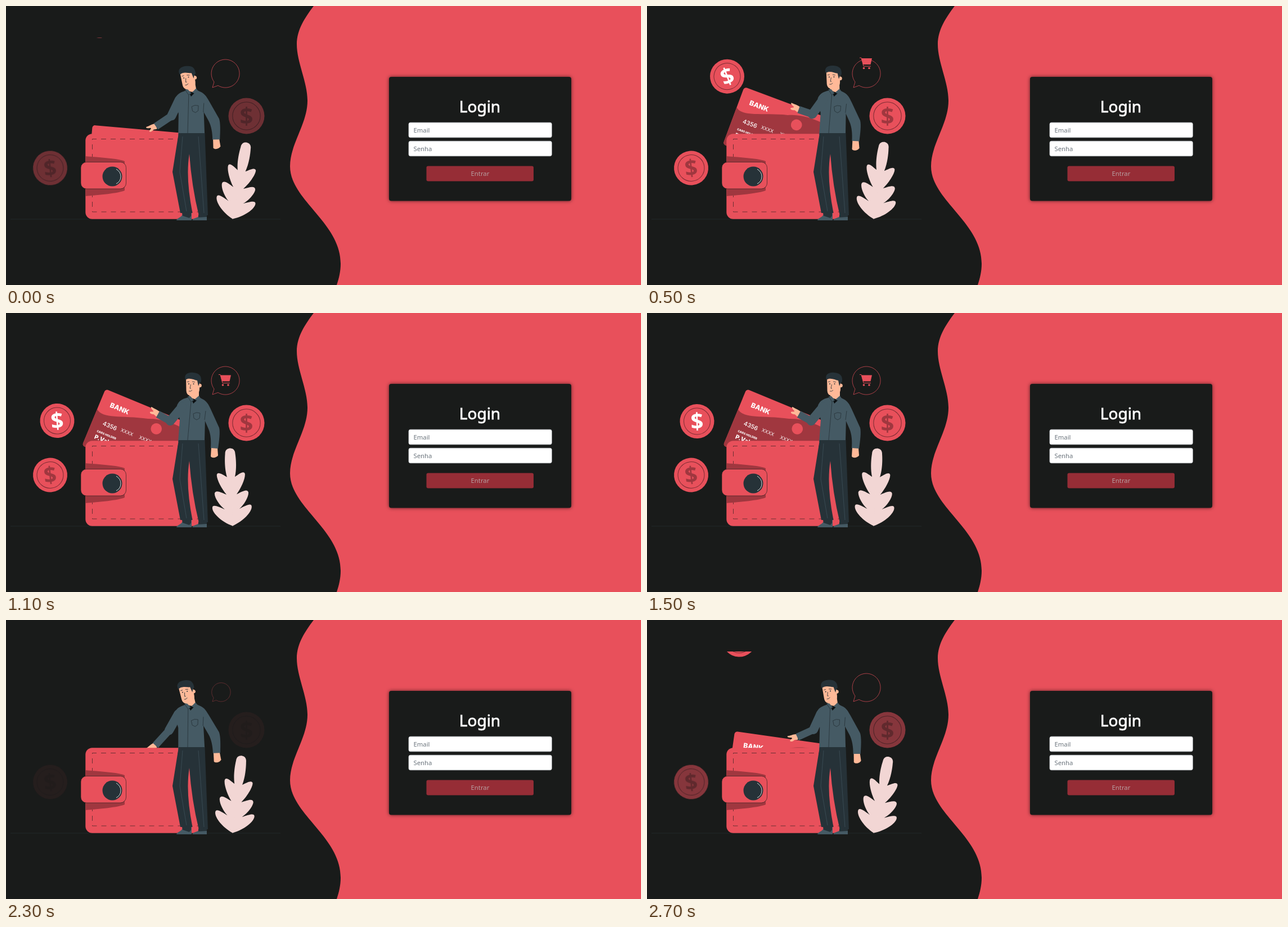
Animation, 1129 px wide and 496 px high, one loop 2800 ms. Source, as an HTML page:

```html
<!DOCTYPE html>
<html lang="pt">
<head>
<meta charset="utf-8">
<title>Login</title>
<style>
  html, body { margin: 0; height: 100%; overflow: hidden; background: #191b1a; }
  svg { display: block; width: 100vw; height: 100vh; font-family: "Noto Sans", "Open Sans", sans-serif; }
  .red { fill: #e8505b; }
  .deep { fill: #a0373f; }
  .navy { fill: #263238; }
  .shirt { fill: #455a64; }
  .skin { fill: #ffb998; }
  .line { fill: none; stroke: #263238; stroke-width: .8; }
  .card text { fill: #fff; font-family: Inter, sans-serif; font-weight: 800; }
  .sign { font-size: 40px; font-weight: 800; text-anchor: middle; }
  .panel { filter: drop-shadow(0 0 3px rgba(0, 0, 0, .6)); }
  .title { font-size: 28px; font-weight: 500; text-anchor: middle; stroke: #fff; stroke-width: .8; }
  .hint { font-size: 11.3px; fill: #6c757d; }
</style>
</head>
<body>
<svg viewBox="0 0 1129 496">
  <defs>
    <clipPath id="top"><path d="M0 56H500V400H0Z"/></clipPath>
    <g id="coin">
      <circle class="red" r="30.5"/>
      <circle r="23.5" fill="none" stroke="#7d2c33"/>
    </g>
    <g id="darkCoin">
      <use href="#coin"/>
      <text class="sign deep" y="14">$</text>
    </g>
    <path id="leaf" d="M-.5 0H0C20-8 35-24 35-33C35-41 24-35 13-30C22-37 31-52 30-59C28-66 18-60 9-56C17-66 26-84 25-92C23-98 15-92 7-87C11-102 10-120 9-128C9-135 5-138 0-138H-.5Z"/>
  </defs>

  <path class="red" d="M547 0C532 20 517 42 517 68C517 100 536 135 536 168C536 210 505 245 505 285C505 345 595 385 595 458C595 472 592 484 588 496H1129V0Z"/>
  <path d="M8 379H488" stroke="#262c2f" stroke-width=".7"/>

  <g id="coins">
    <use href="#darkCoin" transform="translate(78.5 288) rotate(-6)"/>
    <use href="#darkCoin" transform="translate(427.5 195.5) scale(1.05)"/>
  </g>

  <path id="bubble" fill="none" stroke="#e8505b" stroke-width=".7" d="M370 135L367 145L377 141.4A25 25 0 1 0 370 135Z"/>
  <g clip-path="url(#top)">
    <g id="cart" class="red">
      <path d="M381 110.500H400L397.500 121.500H384Z"/>
      <path d="M378 109.500H381L385 124.500H398" fill="none" stroke="#e8505b"/>
      <circle cx="385.500" cy="128" r="1.800"/>
      <circle cx="395" cy="128" r="1.800"/>
    </g>
    <g id="drop">
      <use href="#coin"/>
      <text class="sign" y="14" fill="#fff">$</text>
    </g>
  </g>

  <g id="plant" fill="#f2d6d4">
    <use href="#leaf"/>
    <use href="#leaf" transform="scale(-1 1)"/>
  </g>

  <g id="card" class="card">
    <g transform="translate(177 135) rotate(22.5)">
      <rect class="red" width="170" height="109" rx="5"/>
      <path class="deep" d="M0 39C15 52 45 32 90 20C110 12 130 8 170 14V109H5Q0 109 0 104Z"/>
      <circle class="red" cx="110.500" cy="31" r="9.800"/>
      <text x="18.500" y="27" font-size="12.200">BANK</text>
      <text x="19" y="61.500" font-size="10.500" style="font-weight:500">4356</text>
      <text x="53" y="59.500" font-size="8.500" style="font-weight:400">XXXX</text>
      <text x="88" y="59" font-size="8.500" style="font-weight:400">XXXX</text>
      <text x="14.300" y="76.500" font-size="5.200">CARS HOLDER</text>
      <text x="14.300" y="89" font-size="10.500">P.Vald</text>
    </g>
  </g>
  <path id="hand" class="skin" d="M1-5C-6-6-10-3-17-2C-19 0-14 1-10 1L-9 2L-13 6C-13 9-8 8-5 5H1Z"/>

  <g>
    <rect class="red" x="141.300" y="227.300" width="207" height="151.400" rx="12"/>
    <path d="M348 236.500H153.500V366H348" fill="none" stroke="#191b1a" stroke-width=".6" stroke-dasharray="9 8"/>
    <path class="deep" d="M141.300 267C165 269 200 271 211 276V328C200 333 165 336 141.300 338Z"/>
    <rect class="red" x="133" y="277.500" width="80.500" height="47.500" rx="10" stroke="#191b1a" stroke-width=".6"/>
    <circle class="navy" cx="189" cy="303" r="17.500"/>
    <path d="M196 290Q204 295 204 303Q204 312 196 316" fill="none" stroke="#fff" stroke-width=".8"/>
  </g>

  <g id="body">
    <g id="head">
      <path class="skin" d="M327 138L343 132V152L334 158L326 150Z"/>
      <path class="skin" d="M320 115L345 116L344 135C344 142 340 147 333 147.500C324 148 321 144 320.500 138Z"/>
      <circle class="skin" cx="344.500" cy="129" r="3.300"/>
      <path class="navy" d="M319 119C316 110 322 105 333 106C344 107 348 112 347 122L344 125L342 130L340 120C334 119 326 114 319 119Z"/>
      <path class="line" d="M322 122.500L326 122M331 122L336 123M328.500 127L327 134H329M325 139Q329 140 331 137"/>
      <circle class="navy" cx="325" cy="126" r="1"/>
      <circle class="navy" cx="333.500" cy="126" r="1"/>
    </g>
    <g id="arm">
      <path class="skin" d="M365 239L376 240L377 253C375 257 367 259 364 255Z"/>
      <path class="shirt" d="M345 151C358 156 360 163 364 171L379 204C381 212 379 227 377 241L364 240C365 228 364 215 360 206L353 190Z"/>
    </g>
    <path class="shirt" d="M324 150C312 153 308 156 304 164L309 190L306 229H353L354 185L357 161C352 156 347 152 343 149L334 156Z"/>
    <path d="M329 151L333 161L343 152L335 153Z" fill="#0c1012"/>
    <path class="shirt" d="M323 148L328 148L334 155L329 158ZM343 147L346 152L340 156L335 154Z"/>
    <path class="line" d="M329 158L323 226M333 179L339 177L345 178L344 187L339 190L334 187ZM353 190L355 174M323 148L329 158L334 155"/>
  </g>

  <path class="navy" d="M307 226H353.500L359 372L343 373Q330 320 326 263Q319 305 331.500 368L310 368L296 295Z"/>
  <path class="shirt" d="M312 369L330 368V381H303C305 376 313 376 314 369ZM342 373L357 372V381H331C334 376 341 377 343 373Z"/>
  <path class="navy" d="M313 368H329V373L326 377L314 373ZM342 371L357 370V375L342 376Z"/>
  <path d="M314 232L309 295L321 365M342 232L352 368" fill="none" stroke="#455a64" stroke-width=".6"/>

  <g fill="none" stroke="#455a64" stroke-linecap="round">
    <path id="upper" stroke-width="16"/>
    <path id="elbow" stroke-width="13.500"/>
    <path id="fore" stroke-width="13" stroke-linecap="butt"/>
  </g>

  <rect class="panel" x="681" y="126" width="324" height="220.500" rx="4" fill="#191b1a"/>
  <g fill="#fff">
    <text class="title" x="842.500" y="188.500">Login</text>
    <g stroke="#ced4da" stroke-width=".7">
      <rect x="716" y="207.200" width="254.300" height="26.600" rx="3"/>
      <rect x="716" y="240.200" width="254.300" height="26.600" rx="3"/>
    </g>
  </g>
  <text class="hint" x="724.500" y="224.500">Email</text>
  <text class="hint" x="724.500" y="257.500">Senha</text>
  <rect x="747.500" y="284.500" width="190.500" height="27" rx="3" fill="#962d36"/>
  <text x="843" y="302" font-size="11.300" text-anchor="middle" fill="#b79fa1">Entrar</text>
</svg>

<script>
const LOOP = 2800, STEP = 100, RESTART = 1900;
const el = id => document.getElementById(id);
const set = (id, name, value) => el(id).setAttribute(name, value);
const move = (id, value) => set(id, 'transform', value);
const clamp = x => Math.max(0, Math.min(1, x));
const ease = x => (1 - Math.cos(Math.PI * clamp(x))) / 2;

// Smooth curve through [time, value] keys that never overshoots them.
function track(keys, u) {
  const last = keys.length - 1;
  if (u <= keys[0][0]) return keys[0][1];
  if (u >= keys[last][0]) return keys[last][1];
  const i = keys.findIndex(k => k[0] > u) - 1;
  const rate = j => (keys[j + 1][1] - keys[j][1]) / (keys[j + 1][0] - keys[j][0]);
  const slope = j => {
    if (j === 0) return rate(0);
    if (j === last) return 0;
    const a = rate(j - 1), b = rate(j);
    return a * b > 0 ? 2 * a * b / (a + b) : 0;
  };
  const [t0, v0] = keys[i], [t1, v1] = keys[i + 1];
  const d = t1 - t0, x = (u - t0) / d, y = 1 - x;
  return y * y * (1 + 2 * x) * v0 + x * x * (3 - 2 * x) * v1
    + d * x * y * (y * slope(i) - x * slope(i + 1));
}

const dropX = [[600, 167], [700, 166], [800, 164], [1000, 154], [1400, 129], [1800, 91], [1900, 89]];
const dropY = [[600, 10], [700, 26], [800, 35], [1000, 70], [1400, 169], [1800, 191.5], [1900, 192.5]];
const dropTurn = [[1000, -20], [1400, -22], [1800, -5], [1900, -2]];
const cartY = [[900, -80], [1000, -54], [1300, -6], [1400, -1], [1500, 0]];
const sway = [[0, 0], [400, 6.7], [700, 10.4], [800, 11.3], [1000, 12.2], [1400, 2.1], [1800, -2], [2200, 2.7]];
const grow = [[200, 0], [400, .67], [500, 1]];

function draw(t) {
  // u is the time since the illustration last restarted
  const u = t < RESTART ? Math.min(t + 700, 2200) : t - RESTART;
  const lift = 1.1 * ease((u - 400) / 1000) - .1;
  const back = lift - 1;

  set('coins', 'opacity', clamp((u - 350) / 850));
  const size = track(grow, u);
  move('bubble', `translate(367 145) scale(${size}) translate(-367 -145)`);
  set('bubble', 'opacity', size);
  move('cart', `translate(0 ${track(cartY, u)})`);
  move('drop', `translate(${track(dropX, u)} ${track(dropY, u)}) rotate(${track(dropTurn, u)})`);
  move('plant', `translate(403 378.5) rotate(${track(sway, u)})`);

  move('card', `rotate(${20 * back} 415 249)`);
  move('body', `rotate(${4 * back} 330 226)`);
  move('head', `rotate(${8 * back} 334 150)`);
  move('arm', `rotate(${2 * back} 357 160)`);

  const shoulder = [307 + 6 * lift, 167];
  const elbow = [292 + 20 * lift * (1 - lift), 196 - 4 * lift];
  const wrist = [266 + 4 * lift, 219 - 39 * lift];
  set('upper', 'd', `M${shoulder}L${elbow}`);
  set('elbow', 'd', `M${elbow}h.01`);
  set('fore', 'd', `M${elbow}L${wrist}`);
  move('hand', `translate(${wrist}) rotate(${61 * lift - 18})`);
}

const start = performance.now();
function tick() {
  const t = (performance.now() - start) % LOOP;
  draw(Math.floor(t / STEP) * STEP);
  requestAnimationFrame(tick);
}
tick();
</script>
</body>
</html>
```
